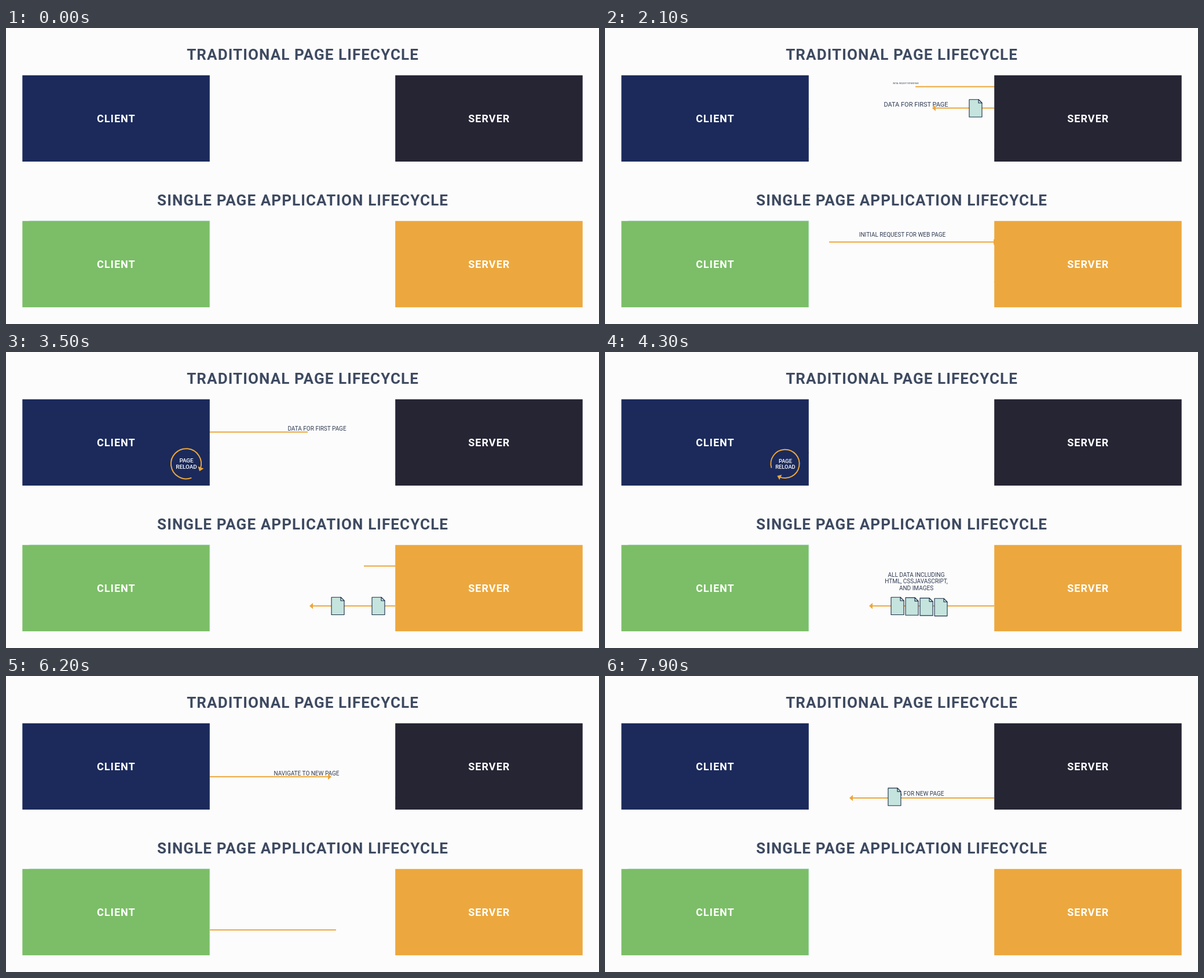
An HTML page that plays this animation: 1024x512 px, repeating every 8 s.

```html
<!DOCTYPE html>
<html lang="en">
<head>
<meta charset="utf-8">
<title>Page lifecycles</title>
<style>
  html, body { margin: 0; width: 100%; height: 100%; overflow: hidden; background: #fcfcfc; }
  svg { display: block; width: 100vw; height: 100vh; }
  text { font-family: Roboto, sans-serif; text-anchor: middle; }
  .title { font-size: 26px; font-weight: 700; letter-spacing: 1.1px; fill: #3e4a61; }
  .name { font-size: 18px; font-weight: 700; letter-spacing: 1.05px; fill: #fff; }
  .note { font-size: 10px; fill: #2f3a52; }
  .reload { font-size: 9.3px; font-weight: 500; fill: #fff; }
  .line { stroke: #eda63a; stroke-width: 1.9; fill: none; }
  .head { fill: #eda63a; }
  .doc { fill: #c5e4de; stroke: #1d2d48; stroke-width: 1.1; stroke-linejoin: round; }
</style>
</head>
<body>
<svg id="stage" viewBox="0 0 1024 512"></svg>
<script>
const LOOP = 8000, STEP = 100, POP = 600;
const LEFT = 352, RIGHT = 672;
const svg = document.getElementById('stage');

function add(parent, tag, attrs, content) {
  const el = document.createElementNS('http://www.w3.org/2000/svg', tag);
  for (const key in attrs) el.setAttribute(key, attrs[key]);
  if (content) el.textContent = content;
  parent.appendChild(el);
  return el;
}

const clamp = (v, lo, hi) => Math.min(hi, Math.max(lo, v));
const place = (el, x, y, s = 1) => el.setAttribute('transform', `translate(${x} ${y}) scale(${s})`);

function backOut(p) {
  const q = clamp(p, 0, 1) - 1;
  return 1 + 2.70158 * q ** 3 + 1.70158 * q * q;
}

// Springs up from `from`, and is gone again at `to`.
function pop(t, from, to) {
  if (t <= from || t >= to) return 0;
  return backOut(Math.min(t - from, to - t) / POP);
}

// Smooth monotone curve through [time, value] points.
function curve(points) {
  const last = points.length - 1;
  const secant = i => (points[i + 1][1] - points[i][1]) / (points[i + 1][0] - points[i][0]);
  const slope = i => {
    if (i === 0) return secant(0);
    if (i === last) return secant(last - 1);
    const a = secant(i - 1), b = secant(i);
    return a * b <= 0 ? 0 : 2 * a * b / (a + b);
  };
  return t => {
    if (t <= points[0][0]) return points[0][1];
    if (t >= points[last][0]) return points[last][1];
    let i = 0;
    while (t > points[i + 1][0]) i++;
    const [t0, v0] = points[i], [t1, v1] = points[i + 1];
    const h = t1 - t0, u = (t - t0) / h, w = 1 - u;
    return v0 * (1 + 2 * u) * w * w + v1 * u * u * (3 - 2 * u)
      + h * u * w * (slope(i) * w - slope(i + 1) * u);
  };
}

// Constant run in px per second, ending hidden behind the far box.
const run = (x, speed, start) => t => x + Math.sign(speed) *
  clamp(Math.abs(speed) * (t - start) / 1000, 0, 500);

const moving = add(svg, 'g', {});
const still = add(svg, 'g', {});
const front = add(svg, 'g', {});

function label(lines, x, y, from, to) {
  const el = add(moving, 'g', {});
  lines.forEach((s, i) => add(el, 'text', {
    class: 'note', x: 0, y: 3.6 + (i - (lines.length - 1) / 2) * 11.8
  }, s));
  return t => place(el, x, y, pop(t, from, to));
}

function arrow(y, dir, tip, tail) {
  const line = add(moving, 'path', { class: 'line' });
  const head = add(moving, 'path', { class: 'head' });
  return t => {
    const a = tail(t), b = tip(t);
    line.setAttribute('d', `M${a} ${y}H${b - dir * 4}`);
    head.setAttribute('d', `M${b} ${y}l${-dir * 6} -5.2v10.4z`);
  };
}

function sheet() {
  const el = add(moving, 'g', { class: 'doc' });
  add(el, 'path', { d: 'M-11 -15H5L11 -9V15.3H-11Z' });
  add(el, 'path', { d: 'M5 -15V-9H11Z' });
  return el;
}

function carried(y, tip, gap) {
  const el = sheet();
  return t => place(el, tip(t) + gap, y);
}

function box(x, y, fill, name) {
  add(still, 'rect', { x, y, width: 323.5, height: 149.3, fill });
  add(still, 'text', { class: 'name', x: x + 162.1, y: y + 80.7 }, name);
}

add(still, 'text', { class: 'title', x: 512.6, y: 54.5 }, 'TRADITIONAL PAGE LIFECYCLE');
add(still, 'text', { class: 'title', x: 512.6, y: 306.5 }, 'SINGLE PAGE APPLICATION LIFECYCLE');
box(28.3, 81.8, '#1b2a5b', 'CLIENT');
box(672.2, 81.8, '#262534', 'SERVER');
box(28.3, 333.8, '#7bbe67', 'CLIENT');
box(672.2, 333.8, '#eca83e', 'SERVER');
add(still, 'path', { d: 'M40 333.4H351.8V483', fill: 'none', stroke: '#b5e0c8', 'stroke-width': 0.8 });

const dataTip = run(RIGHT, -240, 1654);
const newTip = run(RIGHT, -240, 6858);
const allTip = curve([[2795, 672], [3500, 524], [4300, 456], [5400, 416], [6200, 250], [6600, 168]]);
const spread = curve([[3400, 70], [3500, 70], [4300, 25], [5400, -4]]);
const drop = curve([[3500, 0], [4300, 0.7], [5400, 4]]);

function stack(y) {
  const sheets = [3, 2, 1, 0].map(i => [i, sheet()]);
  return t => sheets.forEach(([i, el]) =>
    place(el, allTip(t) + 49 + i * spread(t), y + i * drop(t)));
}

function spinner(x, y, from, to) {
  const el = add(front, 'g', {});
  const ring = add(el, 'g', {});
  const r = 24.6, gap = 49 * Math.PI / 180;
  add(ring, 'path', {
    class: 'line',
    d: `M${r * Math.cos(gap)} ${r * Math.sin(gap)}A${r} ${r} 0 1 1 ${r} 0`
  });
  add(ring, 'path', { class: 'head', d: `M${r} 4l-5 -6.5h10z` });
  add(el, 'text', { class: 'reload', x: 0.5, y: -1.8 }, 'PAGE');
  add(el, 'text', { class: 'reload', x: 0.5, y: 8.2 }, 'RELOAD');
  return t => {
    place(el, x, y, pop(t, from, to));
    ring.setAttribute('transform', `rotate(${20 + 0.1175 * (t - 3500)})`);
  };
}

const parts = [
  label(['INITIAL REQUEST FOR WEB PAGE'], 519.5, 95.5, 150, 2142),
  label(['DATA FOR FIRST PAGE'], 537, 132, 1750, 4100),
  label(['NAVIGATE TO NEW PAGE'], 519, 168.5, 4902, 7300),
  label(['DATA FOR NEW PAGE'], 537, 203.5, 6950, 9300),
  label(['INITIAL REQUEST FOR WEB PAGE'], 513.5, 357.2, 150, 3100),
  label(['ALL DATA INCLUDING', 'HTML, CSSJAVASCRIPT,', 'AND IMAGES'], 537.5, 396.8, 3650, 6020),
  arrow(101.5, 1, run(LEFT, 240, 116), run(LEFT, 240, 1333)),
  arrow(138.5, -1, dataTip, run(RIGHT, -240, 2871)),
  arrow(174.3, 1, run(LEFT, 240, 5325), run(LEFT, 240, 6542)),
  arrow(211, -1, newTip, run(RIGHT, -240, 8075)),
  arrow(370.3, 1, run(LEFT, 165, 130), run(LEFT, 165, 1888)),
  arrow(439.3, -1, allTip, run(RIGHT, -205, 5702)),
  carried(138.7, dataTip, 75),
  carried(208.9, newTip, 78),
  stack(439.2),
  spinner(311, 193.3, 3044, 5300)
];

function draw(ms) {
  const t = Math.floor((ms % LOOP) / STEP) * STEP;
  moving.setAttribute('visibility', t < 200 ? 'hidden' : 'visible');
  parts.forEach(update => update(t));
}

const begin = performance.now();
function tick() {
  draw(performance.now() - begin);
  requestAnimationFrame(tick);
}
tick();
</script>
</body>
</html>
```
